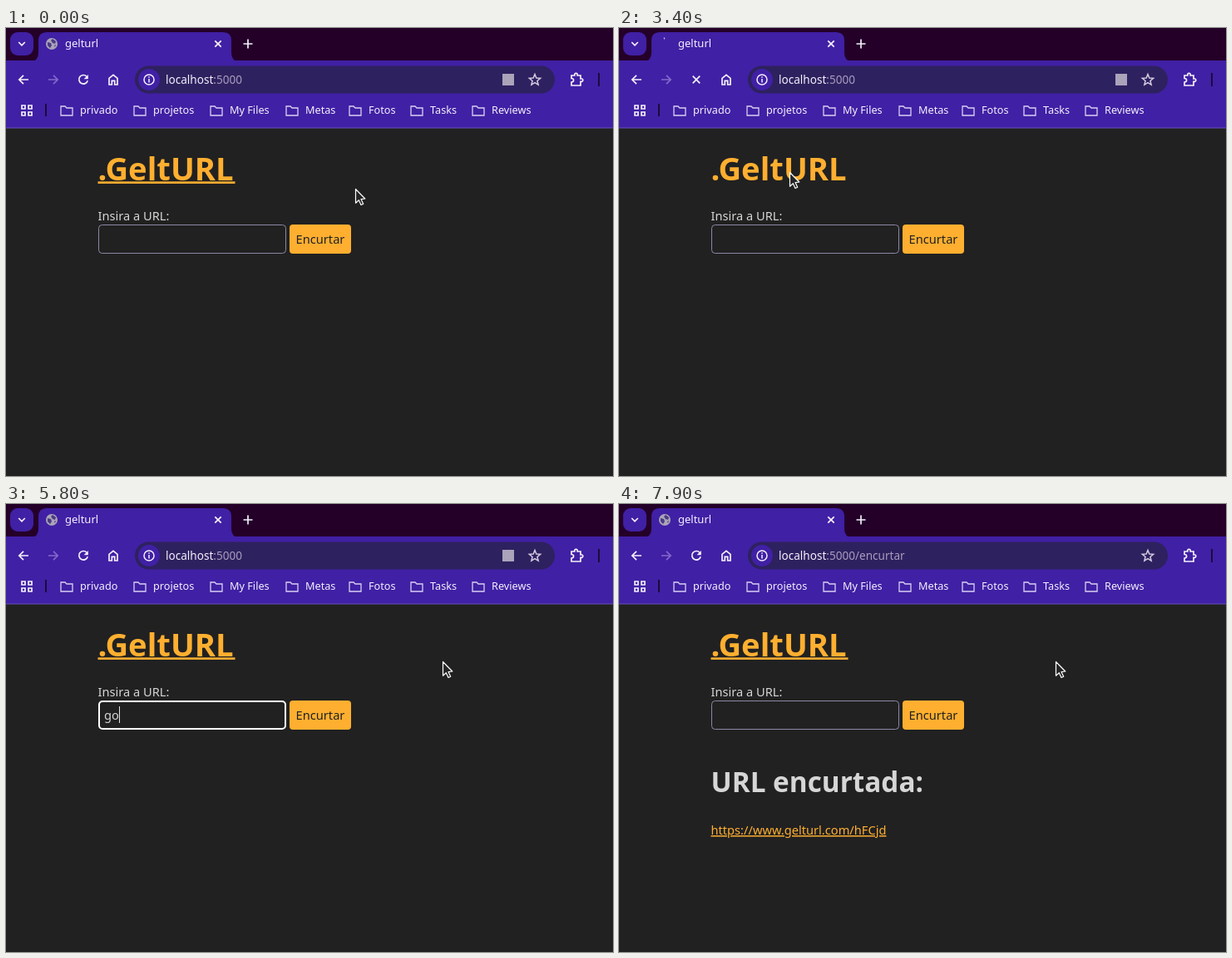
An HTML page for the animation above (8 s loop, 730 px wide and 538 px high).

```html
<!DOCTYPE html>
<html lang="pt">
<head>
<meta charset="utf-8">
<style>
html, body { margin: 0; width: 100%; height: 100%; overflow: hidden; background: #212121; }
svg { display: block; }
text { font-family: "Noto Sans", "Open Sans", sans-serif; white-space: pre; }
.ui { font-size: 12.7px; fill: #f4f0fc; }
.page { font-size: 14.63px; fill: #d6d6d6; }
.bold { font-weight: 700; }
.line { fill: none; stroke: #f4f0fc; stroke-width: 1.7; }
.cursor path { fill: #252525; stroke: #fff; stroke-width: 1.2; stroke-linejoin: round; }
</style>
</head>
<body>
<svg width="730" height="538" viewBox="0 0 730 538">
  <rect width="730" height="538" fill="#212121"/>

  <!-- tab strip -->
  <rect width="730" height="40" fill="#240029"/>
  <rect y="39" width="730" height="81" fill="#4020a4"/>
  <rect y="119.5" width="730" height="1" fill="#6a51bd"/>
  <path d="M29 40q10 0 10-10V15q0-10 10-10H261q10 0 10 10V30q0 10 10 10Z" fill="#4020a4"/>
  <rect x="5" y="5" width="28" height="28" rx="9" fill="#4020a4"/>
  <path class="line" d="M15.2 17l3.8 3.8 3.8-3.8"/>
  <g id="globe">
    <circle cx="55" cy="19" r="7" fill="#aaa4b8"/>
    <path d="M50 17l4 1 1 3-2 3-3-3ZM56 13l4 3-1 3-3-1-2-3ZM58 21l2-1-1 3Z" fill="#4c3a86"/>
  </g>
  <path id="spin" fill="none" stroke="#c9bdf0" stroke-width="2"/>
  <text class="ui" style="font-size:13px" x="71" y="23">gelturl</text>
  <path class="line" d="M251.3 15.3l7.4 7.4m0-7.4l-7.4 7.4M291 13.5v11m-5.5-5.5h11"/>

  <!-- toolbar -->
  <path class="line" d="M27 62H16m5-5.2L15.800 62l5.200 5.200"/>
  <path class="line" style="stroke:#8468cb" d="M51 62H62m-5-5.200L62.200 62 57 67.200"/>
  <g id="reload">
    <path class="line" d="M97 58.200a5.300 5.300 0 1 0 1.200 5"/>
    <path d="M98.800 56v5.200h-5.200Z" fill="#f4f0fc"/>
  </g>
  <path id="stop" class="line" d="M88.700 57.700l8.600 8.600m0-8.600l-8.600 8.600"/>
  <path class="line" d="M124 60.300l5-4 5 4V68h-3.300v-4.600h-3.400V68H124Z"/>
  <rect x="155" y="45.500" width="505" height="33" rx="16.500" fill="#2e215f"/>
  <circle cx="172" cy="62" r="13" fill="#4020a4"/>
  <circle class="line" style="stroke-width:1.500" cx="172" cy="62" r="6"/>
  <path class="line" style="stroke-width:1.500" d="M172 61v4.500m0-7.300v1.500"/>
  <text class="ui" style="font-size:13.570px" x="192" y="67">localhost<tspan id="path" fill="#a69dbd"></tspan></text>
  <rect id="badge" x="597" y="55" width="14" height="14" fill="#aaa3ba"/>
  <path id="star" class="line" style="stroke:#d3cce2;stroke-width:1.500"/>
  <path class="line" d="M680 57h3.800q-.3-2.600 1.700-2.600t1.700 2.600H691v3.800q2.800-.2 2.800 1.800T691 64.400V69H680v-4q2.600-.2 2.600-2.300T680 60.500Z"/>
  <path d="M713 54v16M48 91v15" stroke="#1d0a3b" stroke-width="2"/>
  <path class="line" d="M19 93h4v4h-4ZM27 93h4v4h-4ZM19 101h4v4h-4ZM27 101h4v4h-4Z"/>
  <g id="marks"></g>

  <!-- page -->
  <text class="bold" font-size="38.200" fill="#ffaf30" x="110.500" y="183">.GeltURL</text>
  <rect id="under" x="110.500" y="184.300" width="165" height="2.600" fill="#ffaf30"/>
  <text class="page" x="110.500" y="231">Insira a URL:</text>
  <rect id="field" fill="#212121"/>
  <text class="page" id="typed" x="118" y="259"></text>
  <rect id="caret" y="243" width="1" height="20" fill="#e4e4e4"/>
  <rect x="341" y="236" width="74" height="35" rx="4" fill="#ffaf30"/>
  <text class="page" style="fill:#212121" x="348.600" y="259">Encurtar</text>
  <g id="result">
    <text class="page bold" style="font-size:33.300px" x="110.500" y="346">URL encurtada:</text>
    <text class="page" style="fill:#ffaf30;text-decoration:underline" x="110.500" y="397">https://www.gelturl.com/hFCjd</text>
  </g>

  <g id="cursor" class="cursor">
    <path id="arrow" d="M.5.5V17.200L4.300 13.700 7 19.500 9.700 18.200 7 12.600 11.800 12Z"/>
    <path id="hand" d="M-1.700 1.300a1.600 1.600 0 0 1 3.300 0V6l6 1.200q2.300.5 2 3L8.500 17.500H-.2L-5.800 10.500q-.3-2.200 1.900-1.700l2.200 1.300Z"/>
    <path id="beam" d="M-3-8.500h6.500v2.500h-2V6h2v2.500H-3V6h2V-6h-2Z"/>
  </g>
</svg>
<script>
const $ = id => document.getElementById(id);
const show = (id, on) => $(id).setAttribute('visibility', on ? 'visible' : 'hidden');
const set = (id, attrs) => { for (const k in attrs) $(id).setAttribute(k, attrs[k]); };

const folders = [[65, 'privado'], [153, 'projetos'], [245, 'My Files'], [336, 'Metas'],
  [412, 'Fotos'], [486, 'Tasks'], [560, 'Reviews']];
$('marks').innerHTML = folders.map(([x, name]) =>
  `<path class="line" style="stroke-width:1.3;stroke:#d8cff2" d="M${x + 1} 94h5l2 2h7v9h-14Z"/>
   <text class="ui" x="${x + 24}" y="103">${name}</text>`).join('');

const star = Array.from({ length: 10 }, (_, i) => {
  const a = i * Math.PI / 5, r = i % 2 ? 3.1 : 7;
  return `${636 + r * Math.sin(a)} ${62.5 - r * Math.cos(a)}`;
});
set('star', { d: `M${star.join('L')}Z` });

// pointer stops: time, x, y
const stops = [[0, 420, 193], [2200, 420, 193], [2300, 418, 193], [3100, 205, 173], [3800, 205, 173],
  [4100, 318, 169], [4500, 282, 252], [4800, 282, 252], [4900, 288, 239], [5200, 525, 189], [8000, 525, 189]];
const word = 'google.com';
const keys = [5700, 5800, 5900, 6000, 6100, 6200, 6500, 6700, 6800, 6900];
const SUBMIT = 7200, DONE = 7500;

function pointer(t) {
  const i = stops.findIndex(s => s[0] > t), [t0, x0, y0] = stops[i - 1], [t1, x1, y1] = stops[i];
  const p = (t - t0) / (t1 - t0), e = p * p * (3 - 2 * p);
  return [Math.round(x0 + (x1 - x0) * e), Math.round(y0 + (y1 - y0) * e)];
}

function arc(age) {
  const a = -1.75 + age / 400, b = a + .2 + age / 130;
  const at = v => `${55 + 6.5 * Math.cos(v)} ${19 + 6.5 * Math.sin(v)}`;
  return `M${at(a)}A6.5 6.500 0 ${b - a > Math.PI ? 1 : 0} 1 ${at(b)}`;
}

function draw(now) {
  const t = Math.floor(now % 8000 / 100) * 100;
  const done = t >= DONE, focus = t >= 4700 && !done;
  const began = t >= 3400 && t < 3700 ? 3400 : t >= SUBMIT && !done ? SUBMIT : 0;

  const [x, y] = pointer(t);
  const beam = t >= 4400 && t < 5000;
  const hand = t >= 2900 && t < 3400 || t >= 3600 && t < 4200;
  set('cursor', { transform: `translate(${x} ${y})` });
  show('beam', beam);
  show('hand', hand);
  show('arrow', !beam && !hand);
  show('under', t < 2900 || t >= 4200);

  show('globe', !began);
  show('reload', !began);
  show('stop', began);
  show('spin', began);
  if (began) set('spin', { d: arc(t - began) });

  const pressed = keys.filter(k => k <= t);
  $('typed').textContent = done ? '' : word.slice(0, pressed.length);
  const last = pressed.length ? pressed[pressed.length - 1] : 5000;
  show('caret', focus && (t - last) % 1000 < 500);
  set('caret', { x: Math.round(118 + $('typed').getComputedTextLength()) });
  const w = focus ? 2 : 1;
  set('field', { x: 111 + w / 2, y: 236 + w / 2, width: 226 - w, height: 35 - w, rx: 4,
    stroke: focus ? '#fff' : '#8d87a6', 'stroke-width': w });

  $('path').textContent = done ? ':5000/encurtar' : ':5000';
  show('badge', !done);
  show('result', done);
}

const start = performance.now();
(function tick() {
  draw(performance.now() - start);
  requestAnimationFrame(tick);
})();
</script>
</body>
</html>
```
